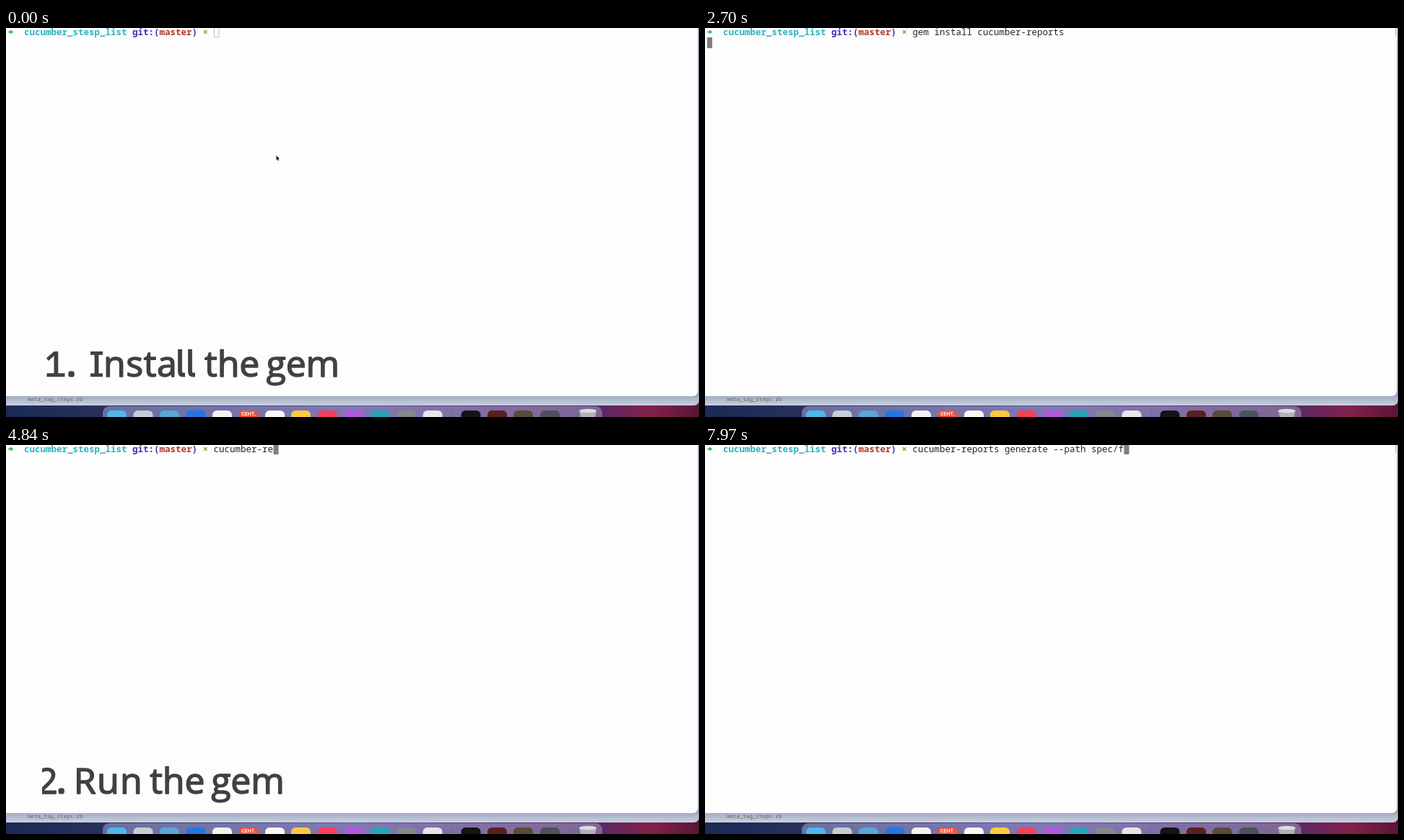
An HTML page with a canvas for the animation above (8000 ms loop, 960 px wide and 540 px high).

```html
<!DOCTYPE html>
<html lang="en">
<head>
<meta charset="utf-8">
<title>Gem install walkthrough</title>
<style>
  html, body { margin: 0; width: 100%; height: 100%; overflow: hidden; background: #fdfdfd; }
  canvas { display: block; width: 960px; height: 540px; }
</style>
</head>
<body>
<canvas id="stage" width="960" height="540"></canvas>
<script>
const ctx = document.getElementById('stage').getContext('2d');
const LOOP = 8000;
const CELL = 7.5, LINE = 15, LEFT = 2.5, PROMPT = 38;
const MONO = '"Noto Sans Mono", "DejaVu Sans Mono", monospace';
const INK = '#262626', TITLE = '#414141', PAPER = '#fdfdfd', BLOCK = '#7f7f7f';

const INSTALL = 'gem install cucumber-reports';
const RUN = 'cucumber-reports generate --path spec/features';
const OUTPUT = [
  [3180, 'Successfully installed cucumber-reports-0.0.1'],
  [3210, 'Parsing documentation for cucumber-reports-0.0.1'],
  [3340, 'Done installing documentation for cucumber-reports after 0 seconds'],
  [3340, '1 gem installed']
];
// [time, characters typed], linear between the points
const INSTALL_KEYS = [[90, 0], [980, 10], [2540, 28]];
const RUN_KEYS = [[3990, 0], [4820, 11], [6540, 30], [7940, 39]];
const ENTER = 2620, DONE = 3400, CLEAR = 3900;

const clamp = v => Math.min(1, Math.max(0, v));
const phase = (t, from, to) => clamp((t - from) / (to - from));

function typed(t, keys) {
  let n = 0;
  for (let i = 1; i < keys.length; i++) {
    const [t0, a] = keys[i - 1], [t1, b] = keys[i];
    if (t >= t0) n = a + (b - a) * phase(t, t0, t1);
  }
  return Math.floor(n + 1e-6);
}

function rect(x, y, w, h, fill) {
  ctx.fillStyle = fill;
  ctx.fillRect(x, y, w, h);
}

function round(x, y, w, h, r, fill) {
  ctx.fillStyle = fill;
  ctx.beginPath();
  ctx.roundRect(x, y, w, h, r);
  ctx.fill();
}

function poly(points, fill) {
  ctx.fillStyle = fill;
  ctx.beginPath();
  points.forEach(([x, y]) => ctx.lineTo(x, y));
  ctx.fill();
}

function text(s, x, y, font, fill, spacing = 0) {
  ctx.font = font;
  ctx.letterSpacing = spacing + 'px';
  ctx.fillStyle = fill;
  ctx.fillText(s, x, y);
}

function gradient(x0, y0, x1, y1, stops) {
  const g = ctx.createLinearGradient(x0, y0, x1, y1);
  stops.forEach(([at, color]) => g.addColorStop(at, color));
  return g;
}

function term(s, col, row, fill = INK, weight = 400) {
  text(s, LEFT + col * CELL, 10 + row * LINE, `${weight} 12.5px ${MONO}`, fill);
}

function prompt(row) {
  const y = 5.5 + row * LINE;
  rect(3, y - 0.8, 4.5, 1.6, '#35b04a');
  poly([[6, y - 3], [10.2, y], [6, y + 3]], '#35b04a');
  term('cucumber_stesp_list', 3, row, '#2fb3bd', 700);
  term('git:(', 23, row, '#3b30b4', 700);
  term('master', 28, row, '#b03a2c', 700);
  term(')', 34, row, '#3b30b4', 700);
  term('×', 36, row, '#9a9a24', 700);
}

function caret(col, row, hollow) {
  const x = LEFT + col * CELL + 0.5, y = row * LINE - 2;
  if (!hollow) return rect(x, y, 7, 15, BLOCK);
  ctx.strokeStyle = '#c2c2c2';
  ctx.lineWidth = 1;
  ctx.strokeRect(x + 0.5, y + 0.5, 6.5, 14);
}

// ---- desktop, windows and dock ----
const ICONS = [
  [153.5, '#4db8ee'], [190, '#c9ccd2'], [226.5, '#5aa6d6'], [263, '#2275e6'],
  [299.5, '#f6f1ee'], [336, '#f0523a'], [372.5, '#f8f8f8'], [408.5, '#fbca40'],
  [445.5, '#f6405a'], [482, '#b558e0'], [518, '#27a5b8'], [554.5, '#85888c'],
  [591, '#e6e6e8'], [644, '#141416'], [680.5, '#5a2020'], [716.5, '#5a4a38'],
  [753.5, '#4c525c']
];

function desktop() {
  rect(0, 500, 960, 40, gradient(0, 0, 960, 0, [
    [0, '#1a2a55'], [0.14, '#28305c'], [0.5, '#62549c'], [0.86, '#5c2862'],
    [0.93, '#84204c'], [1, '#581634']
  ]));
  round(-8, -20, 968, 544, 7, gradient(0, 508, 0, 524, [
    [0, '#929cb2'], [0.3, '#a8b2c6'], [1, '#c8d0e0']
  ]));
  text('meta_tag_steps.rb', 30, 517.5, `400 7.5px ${MONO}`, '#6c645c');
  round(-8, -20, 966.5, 531, 7, PAPER);

  round(134, 525, 692, 40, 9, gradient(134, 0, 826, 0, [
    [0, '#68709f'], [0.5, '#8078b4'], [1, '#806594']
  ]));
  ICONS.forEach(([x, color]) => round(x - 13.5, 531, 27, 27, 6, color));
  ctx.textAlign = 'center';
  text('СЕНТ.', 336, 537.5, '700 6.5px Inter, sans-serif', '#fff6f2');
  ctx.textAlign = 'left';
  rect(617.5, 531, 1, 9, '#6f6898');
  rect(779.5, 531, 1, 9, '#6f6898');
  poly([[794, 531], [818, 531], [816, 540], [796, 540]], '#b2b2b8');
  ctx.fillStyle = '#dcdce0';
  ctx.beginPath();
  ctx.ellipse(806, 531.5, 12, 2.8, 0, 0, Math.PI * 2);
  ctx.fill();
}

// ---- captions ----
// a thin outline brings the regular cut to a medium weight
function word(s, x, spacing) {
  text(s, x, 484, '400 50px "Open Sans", "Noto Sans", sans-serif', TITLE, spacing);
  ctx.strokeStyle = TITLE;
  ctx.lineWidth = 1.5;
  ctx.lineJoin = 'round';
  ctx.strokeText(s, x, 484);
}

function dot(x) {
  round(x - 4.2, 476.2, 8.4, 8.4, 3.4, TITLE);
}

// lowercase l with a curled foot
function ell(x) {
  ctx.strokeStyle = TITLE;
  ctx.lineWidth = 5.8;
  ctx.beginPath();
  ctx.moveTo(x, 446);
  ctx.lineTo(x, 477);
  ctx.quadraticCurveTo(x, 481.5, x + 4.5, 481.5);
  ctx.lineTo(x + 7, 481.5);
  ctx.stroke();
}

function installCaption() {
  poly([[66.5, 449], [72.3, 449], [72.3, 479.3], [81.5, 479.3], [81.5, 484.3], [56.5, 484.3],
    [56.5, 479.3], [66.5, 479.3], [66.5, 455], [59, 462], [55.8, 458.5]], TITLE);
  dot(90.5);
  rect(117, 449, 17, 4.8, TITLE);
  rect(122.6, 449, 5.8, 35, TITLE);
  rect(117, 479.4, 17, 4.8, TITLE);
  word('nsta', 135, 0.6);
  ell(241);
  ell(255);
  word('the', 275, 0);
  word('gem', 360.5, -0.2);
}

function runCaption() {
  word('2', 57.5, 0);
  dot(91);
  word('Run', 108, 1.4);
  word('the', 213.5, 0);
  word('gem', 298.5, -0.2);
}

// slides out from behind the left margin and back again
function caption(draw, t, inAt, inEnd, outAt, outEnd) {
  if (t < inAt || t >= outEnd) return;
  const hidden = Math.pow(1 - phase(t, inAt, inEnd), 3) + Math.pow(phase(t, outAt, outEnd), 3);
  ctx.save();
  ctx.beginPath();
  ctx.rect(50, 430, 500, 78);
  ctx.clip();
  ctx.translate(-410 * hidden, 0);
  draw();
  ctx.restore();
}

function pointer(x, y) {
  poly([[x, y], [x, y + 6.5], [x + 1.5, y + 5.2], [x + 2.6, y + 7.6],
    [x + 3.6, y + 7], [x + 2.6, y + 4.8], [x + 4.4, y + 4.6]], '#121212');
}

function shell(t) {
  prompt(0);
  if (t >= CLEAR) {
    const n = typed(t, RUN_KEYS);
    term(RUN.slice(0, n), PROMPT, 0);
    caret(PROMPT + n, 0);
    return;
  }
  const n = typed(t, INSTALL_KEYS);
  term(INSTALL.slice(0, n), PROMPT, 0);
  if (t < ENTER) return caret(PROMPT + n, 0, t < 60);
  const shown = OUTPUT.filter(([at]) => t >= at);
  shown.forEach(([, s], i) => term(s, 0, i + 1));
  const row = shown.length + 1;
  if (t >= DONE) prompt(row);
  caret(t >= DONE ? PROMPT : 0, row);
}

function frame(now) {
  const t = now % LOOP;
  ctx.clearRect(0, 0, 960, 540);
  desktop();
  shell(t);
  if ((t >= ENTER && t < CLEAR) || t > 7500) rect(956, 0, 1, 11, '#b8b8bc');
  caption(installCaption, t, -1000, -300, 1500, 2150);
  caption(runCaption, t, 4370, 5070, 5800, 6450);
  if (t < 90) pointer(374.5, 177);
  requestAnimationFrame(() => frame(performance.now() - start));
}

const start = performance.now();
frame(0);
</script>
</body>
</html>
```
